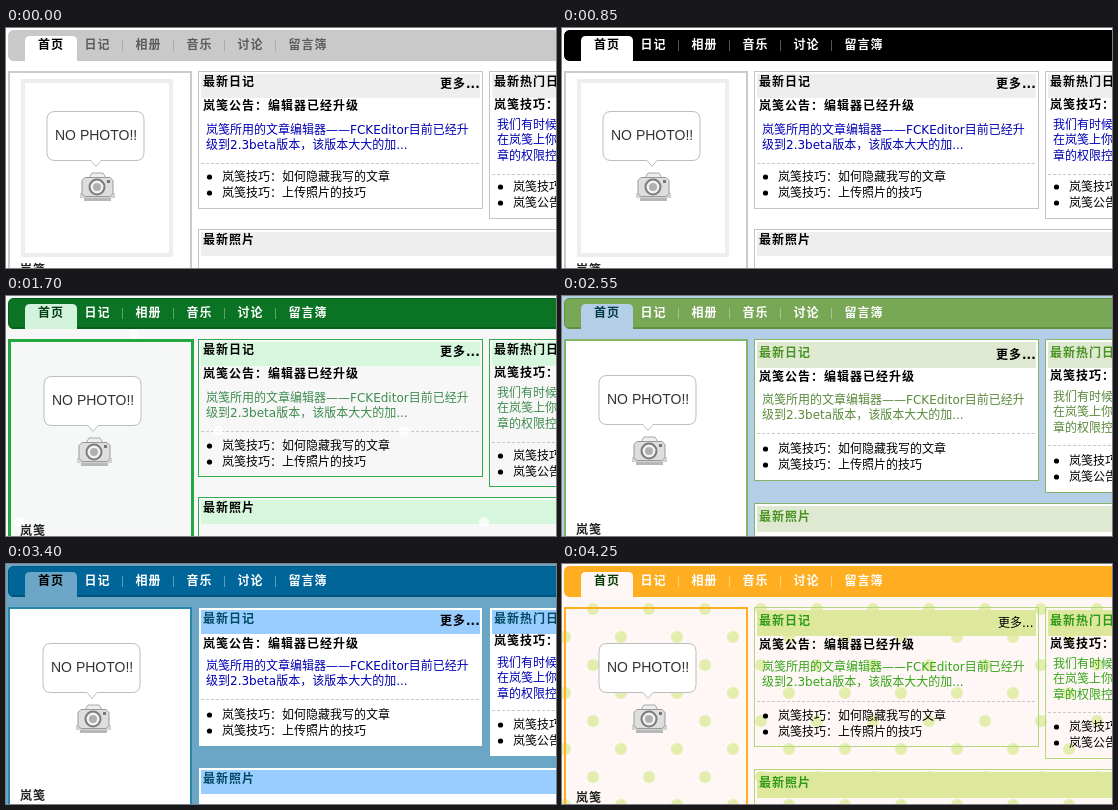
Recreate the animation shown at these times as an HTML page. Size 550 px wide and 240 px high, loop 5.1 s.

```html
<!DOCTYPE html>
<html lang="zh-CN">
<head>
<meta charset="utf-8">
<style>
html, body { margin: 0; width: 550px; height: 240px; overflow: hidden; }
svg { display: block; }
text { font: 12px 'DejaVu Sans', 'Noto Sans CJK TC', 'Noto Sans CJK SC', sans-serif; white-space: pre; }
.b { font-weight: bold; letter-spacing: 1px; }
.tight { letter-spacing: 0; }
.photo { font: 14px 'Liberation Sans', sans-serif; }
rect { shape-rendering: crispEdges; }
</style>
</head>
<body>
<svg id="stage" width="550" height="240" viewBox="0 0 550 240"></svg>
<script>
const HOLD = 850;
const SITE = '岚笺';
const stage = document.getElementById('stage');

// Vertical text positions are the middle of each line.
const plain = {
  page: '#fff', panel: '#fff', panelLine: '#cbcbcb', panelW: 2, panelRight: 186,
  card: '#fff', line: '#c4c4c4', head: '#eeeeee', title: '#000', body: '#0000b4',
  photo: [41, 83], name: 241, title1: 53, headEnd: 70,
  a: { sub: 77, lines: 101, dash: 135, items: 148, end: 181 },
  b: { sub: 76, lines: 96, dash: 146, items: 158, end: 191 },
  top3: 201, frame: '#eeeeee'
};
const themes = [
  { ...plain, bar: '#c9c9c9', tab: '#fff', tabText: '#000', menu: '#5c5c5c', sep: '#ababab' },
  { ...plain, bar: '#000', tab: '#fff', tabText: '#000', menu: '#fff', sep: '#555' },
  { ...plain, page: '#f7f7f7', panel: '#f7f7f7', card: '#f7f7f7',
    bar: '#0a7424', edge: '#06601b', tab: '#d4f3dc', tabText: '#063d13', menu: '#fff', sep: '#58a76a',
    panelLine: '#22a83f', panelW: 3, panelRight: 188, line: '#30ad4c', head: '#d6f6dd', body: '#3f8c50',
    photo: [38, 80], name: 234, frame: null, tint: '#f4f8f6', snow: true,
    a: { sub: 77, lines: 101, dash: 135, items: 149, end: 181 },
    b: { sub: 76, lines: 96, dash: 146, items: 159, end: 191 } },
  { ...plain, page: '#b5cee7', bar: '#78a756', edge: '#5f913e', tab: '#b5cee7', tabText: '#003b42', menu: '#fff', sep: '#a5c58e',
    panelLine: '#84b466', line: '#84b466', head: '#dfe8d0', title: '#489321', body: '#5a8a3c',
    photo: [37, 79], name: 233, title1: 56, headEnd: 72, frame: null,
    a: { sub: 80, lines: 103, dash: 137, items: 152, end: 185 },
    b: { sub: 79, lines: 100, dash: 149, items: 164, end: 197 }, top3: 207 },
  { ...plain, page: '#6ca6c6', bar: '#006699', edge: '#00547e', tab: '#6ca6c6', tabText: '#000', menu: '#fff', sep: '#5b9fc0',
    panelLine: '#2a86ad', line: '#66a9c4', head: '#99ccff', title: '#004a63',
    photo: [37, 79], name: 231, title1: 54, headEnd: 70, frame: null,
    a: { sub: 79, lines: 101, dash: 135, items: 150, end: 183 },
    b: { sub: 76, lines: 98, dash: 146, items: 160, end: 193 }, top3: 203 },
  { ...plain, page: '#fff7f5', bar: '#ffae21', tab: '#fff7f5', tabText: '#0b3d0b', menu: '#fff', sep: '#ffd07d',
    panel: 'none', panelLine: '#ffae21', card: 'none', line: '#b4d67c', head: '#dde89c', title: '#2f9a18', body: '#36a51b',
    photo: [37, 79], name: 233, title1: 56, headEnd: 72, frame: null, dots: '#e2edae', thinMore: true,
    a: { sub: 80, lines: 102, dash: 137, items: 151, end: 183 },
    b: { sub: 79, lines: 99, dash: 148, items: 162, end: 195 }, top3: 205 }
];

const rect = (x, y, r, b, fill, extra = '') =>
  `<rect x="${x}" y="${y}" width="${r - x}" height="${b - y}" fill="${fill}" ${extra}/>`;
const circle = (x, y, r, fill, extra = '') => `<circle cx="${x}" cy="${y}" r="${r}" fill="${fill}" ${extra}/>`;
const text = (x, mid, s, fill = '#000', cls = '') =>
  `<text x="${x}" y="${mid + 4.5}" fill="${fill}" class="${cls}">${s}</text>`;
const path = (d, fill, stroke = 'none') => `<path d="${d}" fill="${fill}" stroke="${stroke}"/>`;
const box = (x, y, r, b, fill, line, w = 1) =>
  rect(x + w / 2, y + w / 2, r - w / 2, b - w / 2, fill, `stroke="${line}" stroke-width="${w}"`);

function backdrop(t) {
  let out = rect(0, 0, 550, 240, t.page);
  if (t.dots)
    for (let row = 0; row < 8; row++)
      for (let x = row % 2 ? 3 : 31; x < 560; x += 56) out += circle(x, 45 + row * 28, 6, t.dots);
  return out;
}

function menuBar(t) {
  let out = path('M551 2.5H8Q2.5 2.5 2.5 8V27Q2.5 32.5 8 32.5H551Z', t.bar, t.edge || t.bar);
  if (t.edge) out += rect(6, 31, 550, 33, t.edge);
  out += path('M19 33V13Q19 8 24 8H66Q71 8 71 13V33Z', t.tab) + text(32, 16, '首页', t.tabText, 'b');
  ['日记', '相册', '音乐', '讨论', '留言簿'].forEach((label, i) => {
    out += text(78.5 + 51 * i, 16, label, t.menu, 'b');
    if (i) out += rect(65 + 51 * i, 12, 66 + 51 * i, 23, t.sep);
  });
  return out;
}

function photo(x, y) {
  const bubble = `M${x + 8} ${y + .5}h81q8 0 8 8v33q0 8-8 8h-35l-5 6-5-6h-36q-8 0-8-8v-33q0-8 8-8Z`;
  return path(bubble, '#fff', '#bdbdbd') +
    text(x + 8, y + 24.5, 'NO PHOTO!!', '#333', 'photo') +
    rect(x + 33, y + 82, x + 68, y + 87, '#d2d2d2') +
    rect(x + 37, y + 87, x + 64, y + 90, '#b8b8b8') +
    path(`M${x + 42} ${y + 67}l3-5h11l3 5Z`, '#eee', '#aaa') +
    path(`M${x + 38} ${y + 66.5}h25l3 3v13l-3 3h-25l-3-3v-13Z`, '#dedede', '#999') +
    circle(x + 50, y + 76, 7.5, '#f2f2f2', 'stroke="#7c7c7c" stroke-width="2"') +
    circle(x + 50, y + 76, 4, '#b0b0b0') +
    rect(x + 60, y + 69, x + 63, y + 72, '#777');
}

function profile(t) {
  let out = box(2, 43, t.panelRight, 250, t.panel, t.panelLine, t.panelW);
  if (t.frame) out += box(15, 51, 167, 229, 'none', t.frame, 4);
  if (t.tint) out += rect(15, 52, 166, 229, t.tint);
  return out + photo(...t.photo) + text(14, t.name, SITE, '#222', 'b');
}

function card(t, x, right, top, end, title) {
  const dy = top - 43;
  return box(x, top, right, end, t.card, t.line) +
    rect(x + 3, top + 3, right - 3, t.headEnd + dy, t.head) +
    text(x + 5, t.title1 + dy, title, t.title, 'b');
}

function article(t, x, right, spot, title, sub, bodyX, lines, items) {
  let out = card(t, x, right, 43, spot.end, title) + text(x + 5, spot.sub, sub, '#000', 'b');
  lines.forEach((s, i) => out += text(bodyX, spot.lines + 15.5 * i, s, t.body));
  out += `<path d="M${x + 3} ${spot.dash + .5}H${right - 3}" stroke="#c8c8c8" stroke-dasharray="3 2"/>`;
  items.forEach((s, i) => {
    const y = spot.items + 16 * i;
    out += circle(x + 11.5, y + 1, 2.6, '#000') + text(x + 24, y, s);
  });
  return out;
}

function draw(t) {
  let out = backdrop(t) + menuBar(t) + profile(t);
  out += article(t, 192, 477, t.a, '最新日记', SITE + '公告：编辑器已经升级', 200,
    [SITE + '所用的文章编辑器——FCKEditor目前已经升', '级到2.3beta版本，该版本大大的加...'],
    [SITE + '技巧：如何隐藏我写的文章', SITE + '技巧：上传照片的技巧']);
  out += text(t.thinMore ? 436 : 434, t.title1 + 2, '更多<tspan class="tight">...</tspan>', '#000', t.thinMore ? '' : 'b');
  out += article(t, 483, 768, t.b, '最新热门日记', SITE + '技巧：', 491,
    ['我们有时候', `在${SITE}上你`, '章的权限控'],
    [SITE + '技巧：', SITE + '公告：']);
  out += card(t, 192, 768, t.top3, 260, '最新照片');
  if (t.snow)
    for (const [x, y] of [[128, 38], [212, 135], [398, 135], [13, 226], [478, 226]])
      out += circle(x, y, 5, '#fff', 'opacity=".75"');
  stage.innerHTML = out;
}

let shown = -1;
function tick() {
  const index = Math.floor(performance.now() / HOLD) % themes.length;
  if (index !== shown) draw(themes[shown = index]);
  requestAnimationFrame(tick);
}
tick();
</script>
</body>
</html>
```
